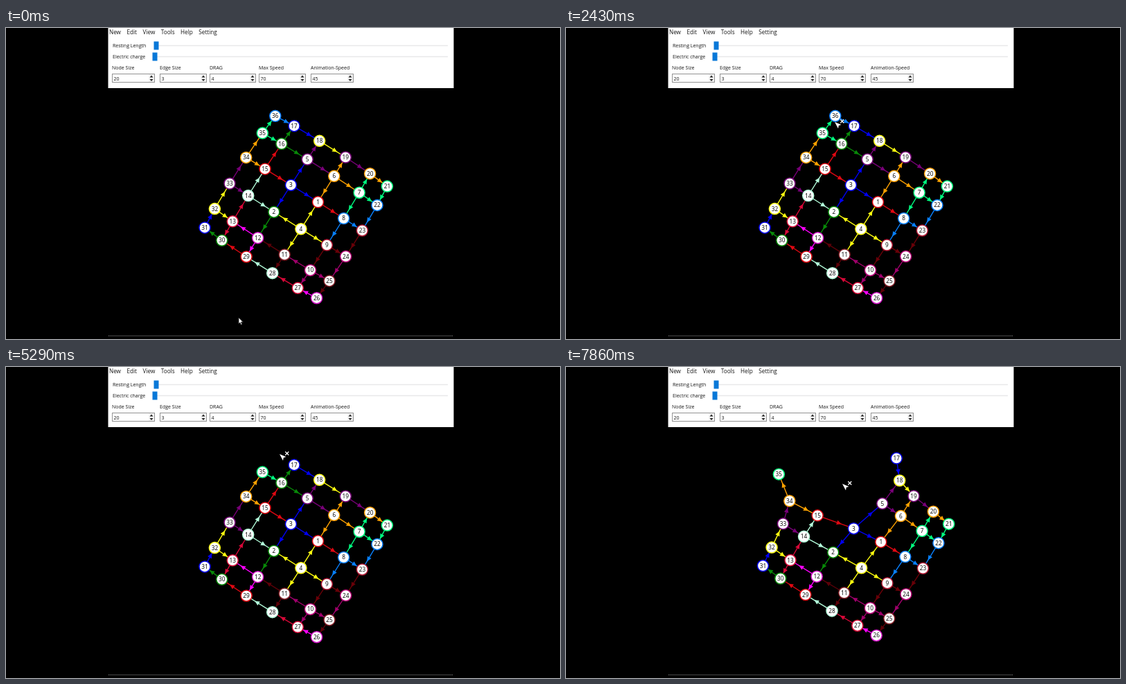
Recreate the animation shown at these times as an HTML page with a canvas. Size 800 by 450 pixels, loop 8000 ms.

```html
<!DOCTYPE html>
<html lang="en">
<head>
<meta charset="utf-8">
<title>Force-directed graph</title>
<style>
  html, body { margin: 0; height: 100%; overflow: hidden; background: #000; }
  canvas { display: block; width: 100vw; height: 100vh; }
</style>
</head>
<body>
<canvas id="stage" width="800" height="450"></canvas>
<script>
const ctx = document.getElementById('stage').getContext('2d');
const LOOP = 8000, STEP = 1000 / 7;
const UI_FONT = '"Open Sans", "Noto Sans", sans-serif';
const NODE_FONT = '8.3px "Noto Sans", "Open Sans", sans-serif';

// Colours repeat every 14 nodes; an edge has the colour of its start node.
const PALETTE = ['#e00812', '#088a08', '#0000f0', '#ffff10', '#780078', '#ffa200', '#00ff80',
  '#0880ff', '#680008', '#a0006c', '#5c0008', '#ff00ff', '#d80838', '#b4ffdc'];
const RINGS = [...PALETTE];
RINGS.splice(8, 4, '#b01834', '#b80078', '#842028', '#d818cc');
const pick = (colors, n) => colors[(n - 1) % colors.length];

// Nodes are numbered along a clockwise spiral around the four centre cells.
function spiral() {
  const cells = [null, [0, 0], [-1, -1], [-1, 0], [0, -1]];
  const turns = [[0, 1], [1, 0], [0, -1], [-1, 0]];
  let [x, y] = cells[3];
  [1, 2, 3, 3, 4, 4, 5, 5, 5].forEach((length, i) => {
    const [dx, dy] = turns[i % 4];
    for (let k = 0; k < length; k++) cells.push([x += dx, y += dy]);
  });
  return cells;
}
const cells = spiral();

// Edges follow the spiral; the others point right, or up and down from the middle.
function pointsForward(a, b) {
  if (a > 4 && b === a + 1) return true;
  if (a > 4 && a === b + 1) return false;
  if (a === 4 || a === 6) return true;
  if (b === 4 || b === 6) return false;
  const [ax, ay] = cells[a], [bx, by] = cells[b];
  return ay === by ? bx > ax : (by > ay) === (Math.max(ay, by) > 0);
}
const edges = [];
for (let a = 1; a <= 36; a++)
  for (let b = a + 1; b <= 36; b++) {
    const gap = Math.abs(cells[a][0] - cells[b][0]) + Math.abs(cells[a][1] - cells[b][1]);
    if (gap === 1) edges.push(b === a + 1 && a > 4 || pointsForward(a, b) ? [a, b] : [b, a]);
  }

// The grid is tilted and tightens towards its border.
const TILT = 32.2 * Math.PI / 180;
const spread = (s, across) => s * (46.25 - .42 * Math.abs(s) ** 3) * (1 - .006 * across * across);
const rest = cells.map(cell => {
  if (!cell) return null;
  const [gx, gy] = cell.map(c => c + .5);
  const u = spread(gx, gy), v = spread(gy, gx);
  return [418.7 + u * Math.cos(TILT) + v * Math.sin(TILT),
    259 + u * Math.sin(TILT) - v * Math.cos(TILT)];
});

const mix = (a, b, p) => [a[0] + (b[0] - a[0]) * p, a[1] + (b[1] - a[1]) * p];
const clamp = p => Math.max(0, Math.min(1, p));
const easeOut = p => 1 - (1 - p) ** 2.4;
const smooth = p => p * p * (3 - 2 * p);

// A removed node leaves a hole; the rest is pushed away from it and drifts up a little.
const pushed = (hole, force, squash, drift) => rest.map(point => {
  if (!point) return null;
  const dx = point[0] - hole[0], dy = point[1] - hole[1];
  const d = Math.hypot(dx, dy) || 1, push = force * Math.exp(-d / 52) / d;
  return [point[0] + push * dx - .6, point[1] + push * dy * squash - drift];
});
const firstHole = pushed(rest[36], 32, .75, 1.6);
const secondHole = pushed(mix(rest[36], rest[16], .5), 100, .45, 2.6);
const REMOVED = { 36: 5200, 16: 6350 };

function layout(t) {
  const first = easeOut(clamp((t - 5290) / 850));
  const second = easeOut(clamp((t - 6400) / 1457));
  return rest.map((point, n) => point && mix(mix(point, firstHole[n], first), secondHole[n], second));
}

const cursorStops = [
  { arrive: 0, leave: 200, at: [336, 419] },
  { arrive: 1150, leave: 1500, at: [322, 171] },
  { arrive: 2290, leave: 2700, at: [388, 136] },
  { arrive: 3430, leave: 4100, at: [589, 5] },
  { arrive: 5000, leave: 5700, at: [395, 126] },
  { arrive: 6140, leave: 6150, at: [414, 163] },
  { arrive: 6350, leave: LOOP, at: [399, 169] }];

function cursorAt(t) {
  const i = cursorStops.findIndex(stop => t < stop.leave);
  const next = cursorStops[i], last = cursorStops[i - 1];
  if (t >= next.arrive) return next.at;
  return mix(last.at, next.at, smooth((t - last.leave) / (next.arrive - last.leave)));
}

function rect(x, y, w, h, fill) {
  ctx.fillStyle = fill;
  ctx.fillRect(x, y, w, h);
}

function polygon(points, fill, stroke) {
  ctx.beginPath();
  for (const [x, y] of points) ctx.lineTo(x, y);
  ctx.closePath();
  ctx.fillStyle = fill;
  ctx.fill();
  if (stroke) { ctx.strokeStyle = stroke; ctx.lineWidth = .8; ctx.stroke(); }
}

function label(text, x, y, size = 7) {
  ctx.font = `${size}px ${UI_FONT}`;
  ctx.fillStyle = '#181818';
  ctx.fillText(text, x, y);
  return ctx.measureText(text).width;
}

function slider(text, y, handleX) {
  label(text, 154, y + 2.5);
  rect(217, y - .75, 421, 1.5, '#e8e8e9');
  rect(handleX, y - 6, 7, 12, '#0878d8');
}

function spinBox(text, value, x, width) {
  label(text, x, 59.5);
  ctx.strokeStyle = '#929292';
  ctx.lineWidth = 1;
  ctx.strokeRect(x + .5, 66.5, width - 1, 12);
  label(value, x + 2.5, 75.5);
  const cx = x + width - 5;
  rect(cx - 4, 67, 8, 11, '#f3f3f3');
  polygon([[cx - 2.5, 71.5], [cx + 2.5, 71.5], [cx, 68.5]], '#222');
  polygon([[cx - 2.5, 74], [cx + 2.5, 74], [cx, 77]], '#222');
}

function drawPanel() {
  rect(147.5, 0, 499, 87, '#fff');
  ctx.textAlign = 'left';
  let x = 149;
  for (const item of ['New', 'Edit', 'View', 'Tools', 'Help', 'Setting'])
    x += label(item, x, 9, 8.2) + 8.5;
  slider('Resting Length', 25.5, 213.5);
  slider('Electric charge', 41.5, 211.5);
  spinBox('Node Size', '20', 153, 62);
  spinBox('Edge Size', '3', 222, 68);
  spinBox('DRAG', '4', 294, 67);
  spinBox('Max Speed', '70', 365, 68);
  spinBox('Animation-Speed', '45', 440, 62);
  for (let dot = 148; dot < 646; dot += 2) rect(dot, 445, 1, 1, '#909090');
}

function drawEdge([x0, y0], [x1, y1], color) {
  ctx.strokeStyle = color;
  ctx.lineWidth = 1.4;
  ctx.beginPath();
  ctx.moveTo(x0, y0);
  ctx.lineTo(x1, y1);
  ctx.stroke();
  ctx.save();
  ctx.translate(x0 + (x1 - x0) * .6, y0 + (y1 - y0) * .6);
  ctx.rotate(Math.atan2(y1 - y0, x1 - x0));
  polygon([[3.5, 0], [-3.5, -3.3], [-3.5, 3.3]], color);
  ctx.restore();
}

function drawNode(n, [x, y]) {
  ctx.beginPath();
  ctx.arc(x, y, 8, 0, 2 * Math.PI);
  ctx.fillStyle = '#fff';
  ctx.fill();
  ctx.strokeStyle = pick(RINGS, n);
  ctx.lineWidth = 1.5;
  ctx.stroke();
  ctx.fillStyle = '#111';
  ctx.fillText(n, x, y + 3);
}

function drawCursor([x, y], t) {
  ctx.save();
  ctx.translate(x, y);
  if (t > 700 && y > 86) {
    polygon([[0, 0], [9.5, 4], [5.8, 5.3], [5, 9.5]], '#fff');
    ctx.strokeStyle = '#fff';
    ctx.lineWidth = 1.3;
    ctx.beginPath();
    ctx.moveTo(8.3, -3.5); ctx.lineTo(13.3, 1.5);
    ctx.moveTo(13.3, -3.5); ctx.lineTo(8.3, 1.5);
    ctx.stroke();
  } else {
    polygon([[0, 0], [0, 9], [2, 7.2], [3.4, 10.4], [4.9, 9.8], [3.5, 6.6], [6.3, 6.6]], '#fff', '#222');
  }
  ctx.restore();
}

function draw(now) {
  const t = Math.floor((now % LOOP + 5) / STEP) * STEP % LOOP;
  const points = layout(t);
  const alive = n => !(t >= REMOVED[n]);

  rect(0, 0, 800, 450, '#000');
  drawPanel();
  for (const [a, b] of edges)
    if (alive(a) && alive(b)) drawEdge(points[a], points[b], pick(PALETTE, a));
  ctx.font = NODE_FONT;
  ctx.textAlign = 'center';
  for (let n = 1; n <= 36; n++) if (alive(n)) drawNode(n, points[n]);
  drawCursor(cursorAt(t), t);
}

function tick() {
  draw(performance.now());
  requestAnimationFrame(tick);
}
tick();
</script>
</body>
</html>
```
